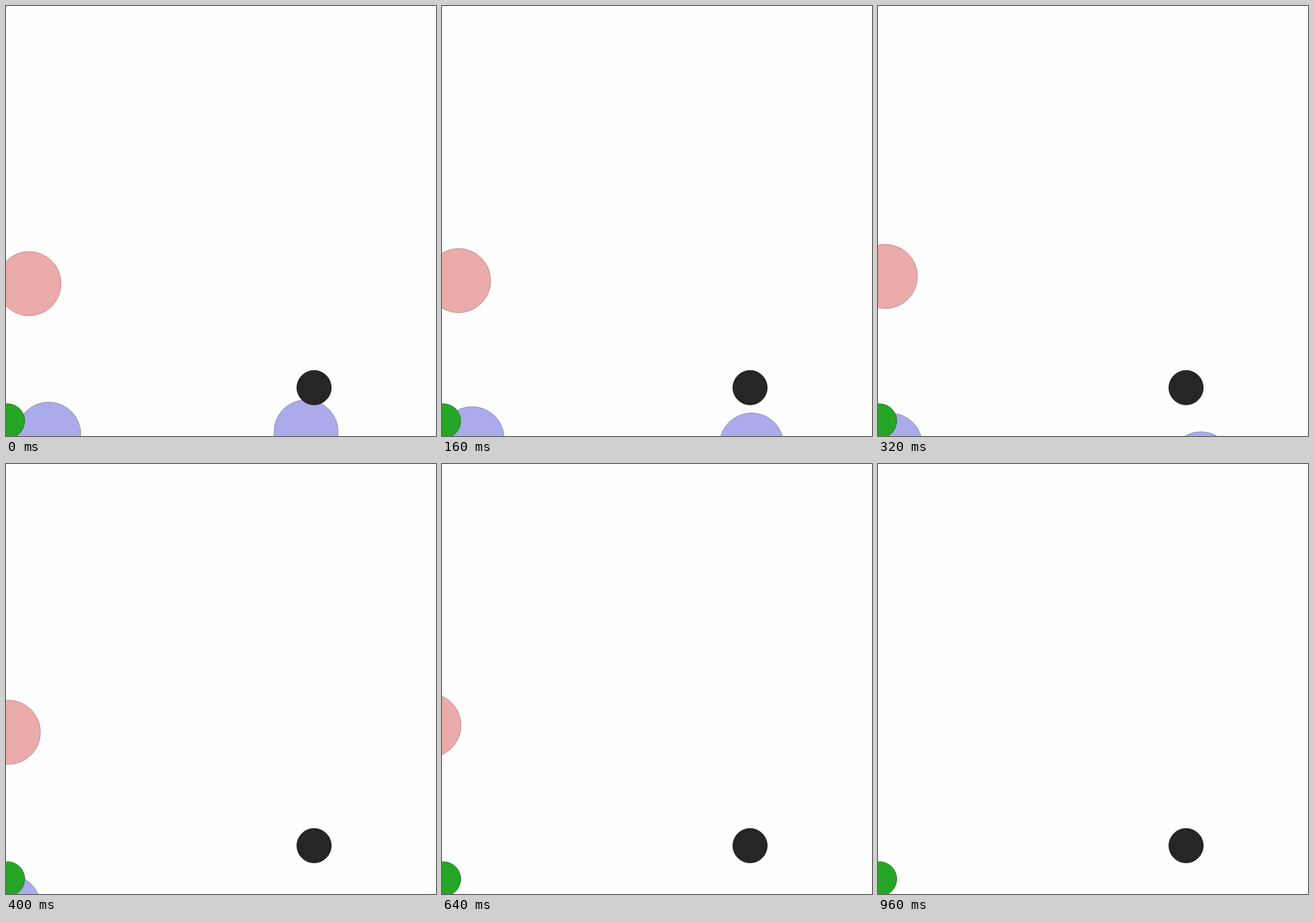
An HTML page for the animation above (8000 ms loop, 700 by 700 pixels).

```html
<!DOCTYPE html>
<html lang="en">
<head>
<meta charset="utf-8">
<title>Drifting discs</title>
<style>
  html, body { margin: 0; height: 100%; overflow: hidden; background: #fefefe; }
  svg { display: block; width: 100%; height: 100%; }
</style>
</head>
<body>
<svg viewBox="0 0 700 700">
  <g id="movers" stroke-width="1"></g>
  <circle cx="2.5" cy="675.6" r="28" fill="#26a626" stroke="#1c7c1c"/>
  <circle cx="501.5" cy="621.3" r="28" fill="#262626" stroke="#1c1c1c"/>
</svg>
<script>
const LOOP = 8000, STEP = 40, UNIT = 160;
const SLOW_START = 0.3; // share of the speed deficit left after one unit

// Start, final speed per unit, and distance lost while picking up speed.
const discs = [
  { fill: "#ebabab", stroke: "#bc8989", x: [37.5, -17, 9.3], y: [452, -7.5, 3.6] },
  { fill: "#ababeb", stroke: "#8989bc", x: [69.5, -33, 18], y: [697, 11.8, -6.2] },
  { fill: "#ababeb", stroke: "#8989bc", x: [488.5, 24, -12.1], y: [693.3, 34.5, -18.7] },
];

const movers = document.getElementById("movers");
for (const disc of discs) {
  disc.node = document.createElementNS(movers.namespaceURI, "circle");
  disc.node.setAttribute("r", 52.2);
  disc.node.setAttribute("fill", disc.fill);
  disc.node.setAttribute("stroke", disc.stroke);
  movers.append(disc.node);
}

const position = ([start, speed, lag], u) =>
  start + speed * u + lag * (1 - SLOW_START ** u);

function draw(now) {
  const u = Math.floor((now % LOOP) / STEP) * STEP / UNIT;
  for (const { node, x, y } of discs) {
    node.setAttribute("cx", position(x, u));
    node.setAttribute("cy", position(y, u));
  }
}

const begin = performance.now();
function tick() {
  draw(performance.now() - begin);
  requestAnimationFrame(tick);
}
tick();
</script>
</body>
</html>
```
